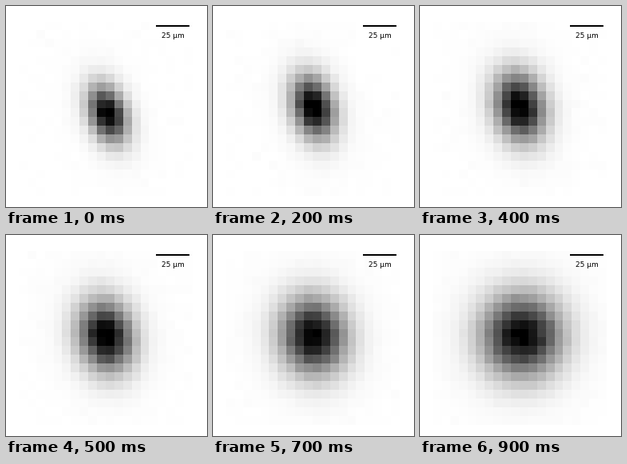
Write a matplotlib script that moves like this. It is 252x252 px and loops after 1 s.

```python
import numpy as np
import matplotlib.pyplot as plt
from matplotlib.animation import FuncAnimation
from matplotlib.lines import Line2D

SIZE, CELLS = 252, 20
LEFT, TOP, SPAN = 16, 20, 218
FRAMES, INTERVAL = 10, 100

rows, cols = np.mgrid[:CELLS, :CELLS]


def spot(frame):
    """A narrow leaning spot that rounds out as it spreads."""
    p = frame / (FRAMES - 1)
    width = 1.4 + 1.6 * p ** 1.5
    height = 2.15 + 0.95 * p
    lean = 0.2 * (1 - p)
    cx = 9.75 - 0.25 * np.sin(np.pi * p)
    cy = 9.3 + 0.8 * np.exp(-12 * p)

    dy = rows - cy
    dx = cols - cx - lean * dy
    r2 = (dx / width) ** 2 + (dy / height) ** 2
    light = 0.95 * np.exp(-r2 / 2) + 0.05 * np.exp(-r2 / 6)
    grain = np.random.default_rng(50 + frame).normal(size=light.shape)
    light *= 1 + 0.025 * grain
    light = 1.03 * light / light.max() + 0.004 * np.abs(grain)
    return np.clip(light, 0, 1)


fig = plt.figure(figsize=(SIZE / 72, SIZE / 72), dpi=72, facecolor="white")
ax = fig.add_axes([LEFT / SIZE, 1 - (TOP + SPAN) / SIZE, SPAN / SIZE, SPAN / SIZE])
ax.axis("off")
image = ax.imshow(spot(0), cmap="gray_r", vmin=0, vmax=1,
                  interpolation="nearest", aspect="auto")

bar_y = 1 - 25 / SIZE
fig.add_artist(Line2D([188 / SIZE, 230 / SIZE], [bar_y, bar_y], color="black",
                      linewidth=2, solid_capstyle="butt"))
fig.text(209 / SIZE, 1 - 40 / SIZE, "25 µm", family="DejaVu Sans",
         fontsize=9, ha="center", va="baseline")


def update(frame):
    image.set_data(spot(frame))
    return [image]


animation = FuncAnimation(fig, update, frames=FRAMES, interval=INTERVAL,
                          repeat=True, repeat_delay=0)
plt.show()
```
